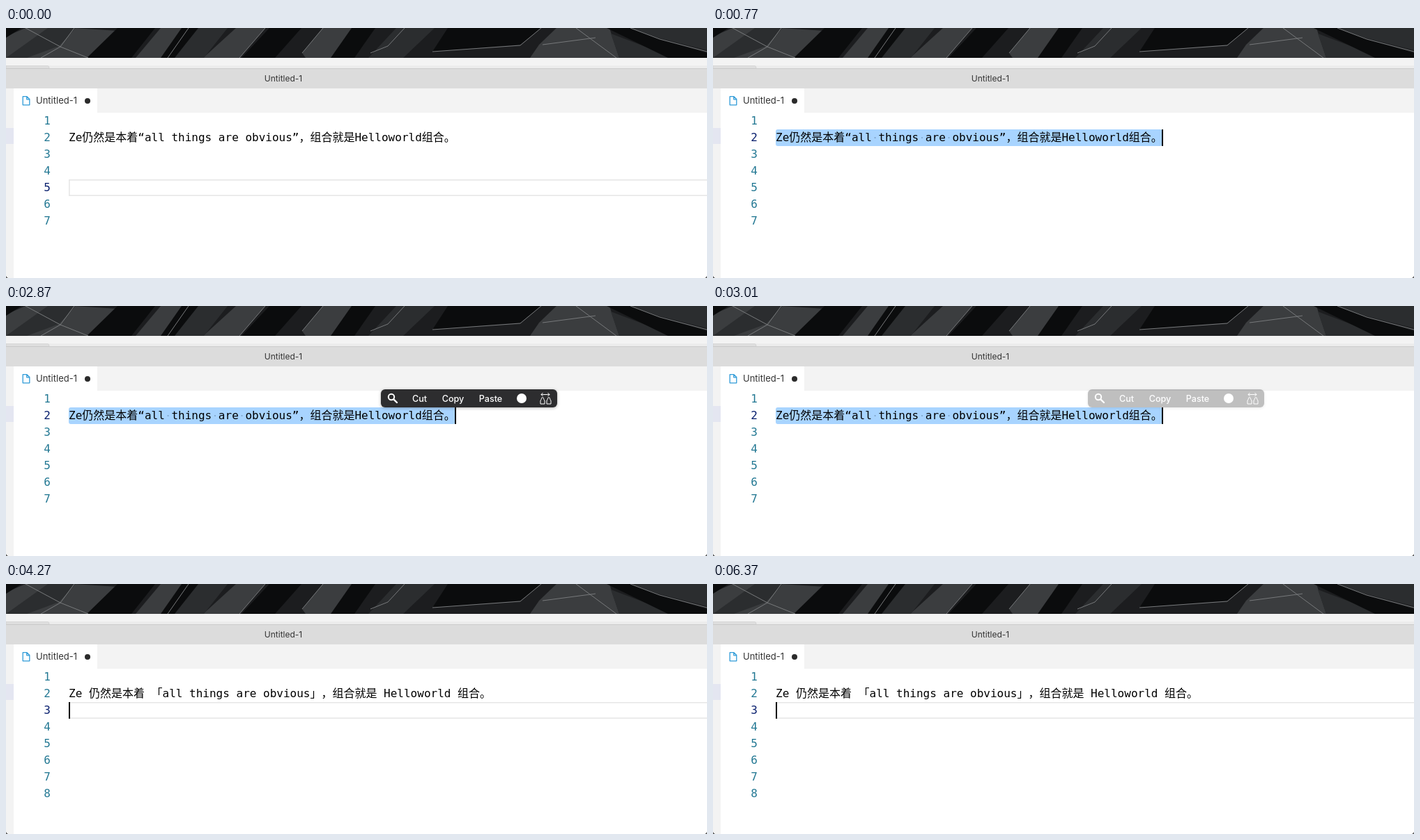
An HTML page that plays this animation: 1006x360 px, repeating every 6.58 s.

```html
<!DOCTYPE html>
<html lang="zh-CN">
<head>
<meta charset="utf-8">
<title>Editor</title>
<style>
  html, body { margin: 0; width: 100%; height: 100%; overflow: hidden; background: #fff; }
  svg { display: block; }
  .ui { font-family: Inter, "Liberation Sans", sans-serif; fill: #333; }
  .code {
    font: 16px "DejaVu Sans Mono", "Noto Sans CJK SC", "Noto Sans CJK", "Noto Sans CJK JP", monospace;
    text-spacing-trim: space-all;
    font-variant-ligatures: none;
  }
  #numbers { fill: #237893; }
  #numbers .active { fill: #0b216f; }
  #popup { filter: drop-shadow(0 1px 2px rgba(0, 0, 0, .3)); }
  #popup text { font-size: 12.6px; font-weight: 500; fill: #fff; text-anchor: middle; }
</style>
</head>
<body>
<svg width="1006" height="360" viewBox="0 0 1006 360">
  <!-- wallpaper -->
  <svg width="1006" height="43">
    <rect width="1006" height="43" fill="#1c1d1f"/>
    <g fill="#3b3d3f">
      <path d="M0 12L28 0H98L160 4L118 43H0Z"/>
      <path d="M186 43L222 0H262L232 43Z"/>
      <path d="M283 43L330 0H372L335 43Z"/>
      <path d="M425 36L455 0H500L470 43H430Z"/>
      <path d="M765 24L790 0H866L880 43H752Z"/>
    </g>
    <g fill="#2b2d2f">
      <path d="M60 0H100L76 26L30 43H0Z"/>
      <path d="M240 43L275 0H318L284 43Z"/>
      <path d="M520 43L560 0H615L570 43Z"/>
      <path d="M895 0H1006V32L935 14Z"/>
      <path d="M868 8L960 43H880Z"/>
    </g>
    <g fill="#0b0c0d">
      <path d="M0 0H22L0 14Z"/>
      <path d="M160 0H214L180 43H116Z"/>
      <path d="M252 0H276L242 43H222Z"/>
      <path d="M378 0H424L386 43H338Z"/>
      <path d="M496 0H530L500 43H466Z"/>
      <path d="M634 0H768L738 24L612 34Z"/>
      <path d="M862 0H896L938 16L1006 36V43H950Z"/>
    </g>
    <g fill="none" stroke="#77797b" stroke-width="1">
      <path d="M28 0L78 27L50 43M98 0L78 27L118 43"/>
      <path d="M262 0L232 43M372 0L335 43M455 0L425 36"/>
      <path d="M523 36L548 26L572 0M612 34L738 25L768 0"/>
      <path d="M770 24L846 14M818 0L876 43M896 0L938 16L1006 34"/>
    </g>
  </svg>

  <!-- window chrome -->
  <rect y="43" width="1006" height="15" fill="#f3f3f3"/>
  <rect y="54" width="1006" height="4" fill="#ececec"/>
  <path d="M0 54.5H60Q62 54.5 62 58H0Z" fill="#e0e0e0" stroke="#d0d0d0" stroke-width=".8"/>
  <rect y="58" width="1006" height="29" fill="#dcdcdc"/>
  <rect y="58" width="1006" height="1" fill="#cbcbcb"/>
  <text class="ui" x="398" y="77" font-size="12" text-anchor="middle">Untitled-1</text>
  <rect y="87" width="1006" height="35" fill="#f3f3f3"/>
  <rect y="122" width="11" height="238" fill="#f3f3f3"/>
  <rect y="144" width="11" height="23" fill="#e4e6f1"/>
  <rect x="11" y="87" width="120" height="36" fill="#fff"/>
  <path d="M24.2 98.7H30L33.8 102.5V110.8H24.2ZM29.8 98.9V102.8H33.6" fill="none" stroke="#2f9bd8" stroke-width="1.3" stroke-linejoin="round"/>
  <text class="ui" x="43" y="109" font-size="13">Untitled-1</text>
  <circle cx="117" cy="105" r="4" fill="#2b2b2b"/>
  <path d="M0 357V360H3Q1 359 0 357ZM1006 357V360H1003Q1005 359 1006 357Z" fill="#555"/>

  <!-- editor -->
  <rect id="outline" x="90.8" width="930" height="22.4" fill="none" stroke="#e7e7e7" stroke-width="1.6"/>
  <rect id="selection" x="90" y="146" height="24" rx="3" fill="#a8d4ff"/>
  <g id="dots" fill="#7fa5cb"></g>
  <g id="numbers" class="code" text-anchor="end"></g>
  <text id="line" class="code" x="90" y="163"></text>
  <rect id="caret" width="2" height="24"/>

  <g id="popup" class="ui">
    <rect x="538" y="120" width="253" height="26" rx="6" fill="#2d2d2f"/>
    <g fill="none" stroke="#fff">
      <circle cx="553" cy="131" r="4.2" stroke-width="2"/>
      <path d="M556.3 134.3L561 139" stroke-width="2.4" stroke-linecap="round"/>
      <path d="M768 127.5H780M770.5 125L768 127.5L770.5 130M777.5 125L780 127.5L777.5 130" stroke-width="1"/>
      <path id="figure" d="M768.3 133.5a1.7 1.7 0 1 1 3.4 0q-.2 1.5 1.3 2.5V141H767V136q1.500-1 1.300-2.500Z" stroke-width="1"/>
      <use href="#figure" x="9"/>
    </g>
    <text x="593.5" y="138">Cut</text>
    <text x="641.5" y="138">Copy</text>
    <text x="695.5" y="138">Paste</text>
    <circle cx="740" cy="133" r="7" fill="#fff"/>
  </g>
</svg>
<script>
const LOOP = 6580, LEFT = 90, TOP = 122, ROW = 24;
const BEFORE = 'Ze仍然是本着“all things are obvious”，组合就是Helloworld组合。';
const AFTER = 'Ze 仍然是本着 「all things are obvious」，组合就是 Helloworld 组合。';
const DRAG = 350, REPLACE = 3220;

// Each track lists [start time, value]; values hold until the next start.
const selected = [[0, 0], [420, 7], [490, 21], [560, 32], [630, 42], [700, 49], [REPLACE, 0]];
const caretOn = [[0, 0], [DRAG, 1], [1120, 0], [1680, 1], [2170, 0], [2660, 1],
  [3780, 0], [4270, 1], [4830, 0], [5390, 1], [5880, 0], [6370, 1]];
const popupAlpha = [[0, 0], [2170, .5], [2240, 1], [2940, .6], [3010, .3], [3080, 0]];

const $ = id => document.getElementById(id);
const at = (track, t) => track.findLast(([start]) => start <= t)[1];
const set = (el, attrs) => { for (const k in attrs) el.setAttribute(k, attrs[k]); };
const show = (el, on) => set(el, { visibility: on ? 'visible' : 'hidden' });
const rowTop = n => TOP + (n - 1) * ROW;

function add(parent, tag, attrs) {
  const el = document.createElementNS('http://www.w3.org/2000/svg', tag);
  set(el, attrs);
  return parent.appendChild(el);
}

// x position in front of the character at the given index
function charX(index) {
  let x = LEFT;
  for (const c of BEFORE.slice(0, index)) x += c < '\u2e80' ? 9.632 : 16;
  return x;
}

const numbers = Array.from({ length: 8 }, (_, i) => {
  const el = add($('numbers'), 'text', { x: 64, y: rowTop(i + 1) + 17 });
  el.textContent = i + 1;
  return el;
});

const dots = [...BEFORE.matchAll(' ')].map(({ index }) => ({
  index, el: add($('dots'), 'circle', { cx: charX(index) + 4.8, cy: 158, r: 1.1 })
}));

function draw(t) {
  const replaced = t >= REPLACE, dragging = t >= DRAG && !replaced;
  const row = replaced ? 3 : dragging ? 2 : 5;
  const count = at(selected, t), end = charX(count);
  const text = replaced ? AFTER : BEFORE;

  if ($('line').textContent !== text) $('line').textContent = text;
  numbers.forEach((el, i) => {
    el.classList.toggle('active', i + 1 === row);
    show(el, i < 7 || replaced);
  });
  set($('outline'), { y: rowTop(row) + .8 });
  show($('outline'), !dragging);
  set($('selection'), { width: end - LEFT });
  dots.forEach(({ index, el }) => show(el, index < count));
  set($('caret'), { x: count ? Math.round(end - 1) : LEFT, y: rowTop(row) });
  show($('caret'), at(caretOn, t));
  set($('popup'), { opacity: at(popupAlpha, t) });
}

const began = performance.now();
function tick() {
  draw((performance.now() - began) % LOOP);
  requestAnimationFrame(tick);
}
tick();
</script>
</body>
</html>
```
